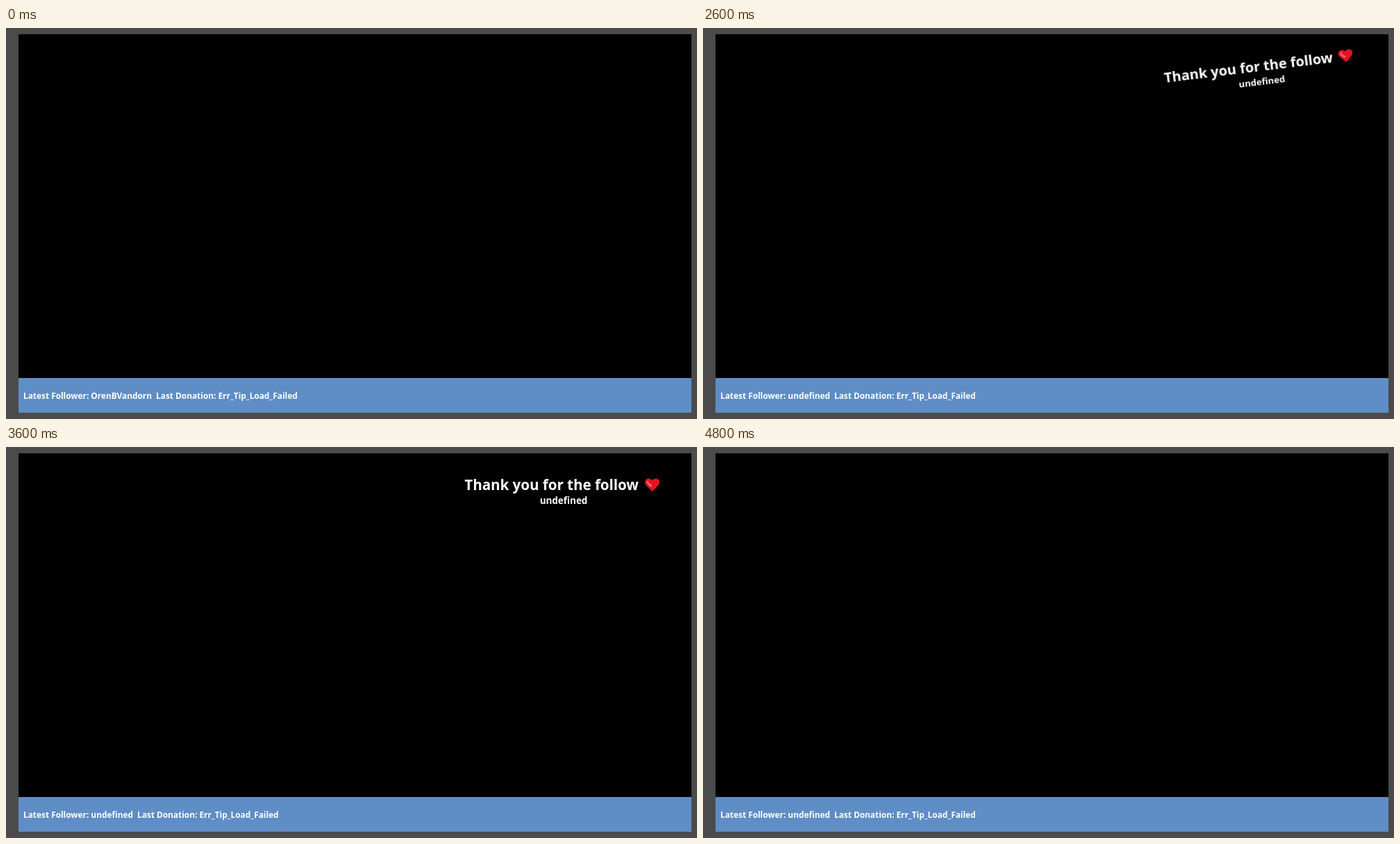
An HTML page that plays this animation: 995 by 563 pixels, repeating every 5.87 s.

```html
<!DOCTYPE html>
<html lang="en">
<head>
<meta charset="utf-8">
<title>Stream overlay</title>
<style>
  html, body { margin: 0; width: 100%; height: 100%; overflow: hidden; background: #4b4b4b; }
  svg { display: block; width: 995px; height: 563px; }
  text { font-family: "Open Sans", "Noto Sans", sans-serif; font-weight: 700; fill: #fff; }
  #alert { transform-origin: 803px 63px; }
</style>
</head>
<body>
<svg viewBox="0 0 995 563">
  <clipPath id="screen"><rect x="18" y="9" width="969" height="545"/></clipPath>
  <rect x="18" y="9" width="969" height="495"/>
  <rect x="18" y="504" width="969" height="50" fill="#5f8dc6"/>
  <text x="25" y="534" font-size="11.87">Latest Follower: <tspan id="follower"></tspan><tspan dx="6">Last Donation: Err_Tip_Load_Failed</tspan></text>

  <g clip-path="url(#screen)">
    <g id="alert">
      <text x="664" y="62" font-size="20">Thank you for the follow</text>
      <text x="803" y="82" font-size="13.1" text-anchor="middle">undefined</text>
      <path fill="#e81224" d="M927.3 64 L918.8 55.4 C915.4 51.6 917.4 46 922.2 46 C924.4 46 926.2 47 927.3 48.8 C928.4 47 930.2 46 932.4 46 C937.2 46 939.2 51.6 935.8 55.4 Z"/>
      <path d="M920.6 50.6 Q921.6 53.4 925.6 56.2" fill="none" stroke="#f0775f" stroke-width="2.4" stroke-linecap="round"/>
    </g>
  </g>
</svg>
<script>
  const LOOP = 5870, STEP = 200 / 3;
  const FOLLOW_AT = 2130, ALERT_START = 2105, ALERT_END = 4330;
  const follower = document.getElementById("follower");

  const pose = (time, opacity, angle, scale) => ({
    offset: (time - ALERT_START) / (ALERT_END - ALERT_START),
    opacity,
    transform: `rotate(${angle}deg) scale(${scale})`,
    easing: "ease"
  });

  // Fade in, tilt, straighten, grow, fade out.
  const alertMotion = document.getElementById("alert").animate([
    pose(ALERT_START, 0, 0, 1),
    pose(2489, 1, 0, 1),
    pose(2989, 1, -20, 1),
    pose(3073, 1, -20, 1),
    pose(3573, 1, 0, 1),
    pose(3910, 1, 0, 1.4),
    pose(3930, 1, 0, 1.4),
    pose(ALERT_END, 0, 0, 1.4)
  ], { duration: ALERT_END - ALERT_START, fill: "both" });
  alertMotion.pause();

  function draw(now) {
    // The picture advances 15 times a second.
    const time = Math.floor((now % LOOP + 4) / STEP) * STEP;
    const name = time < FOLLOW_AT ? "OrenBVandorn" : "undefined";
    if (follower.textContent !== name) follower.textContent = name;
    alertMotion.currentTime = time - ALERT_START;
  }

  const start = performance.now();
  function tick() {
    draw(performance.now() - start);
    requestAnimationFrame(tick);
  }
  tick();
</script>
</body>
</html>
```
